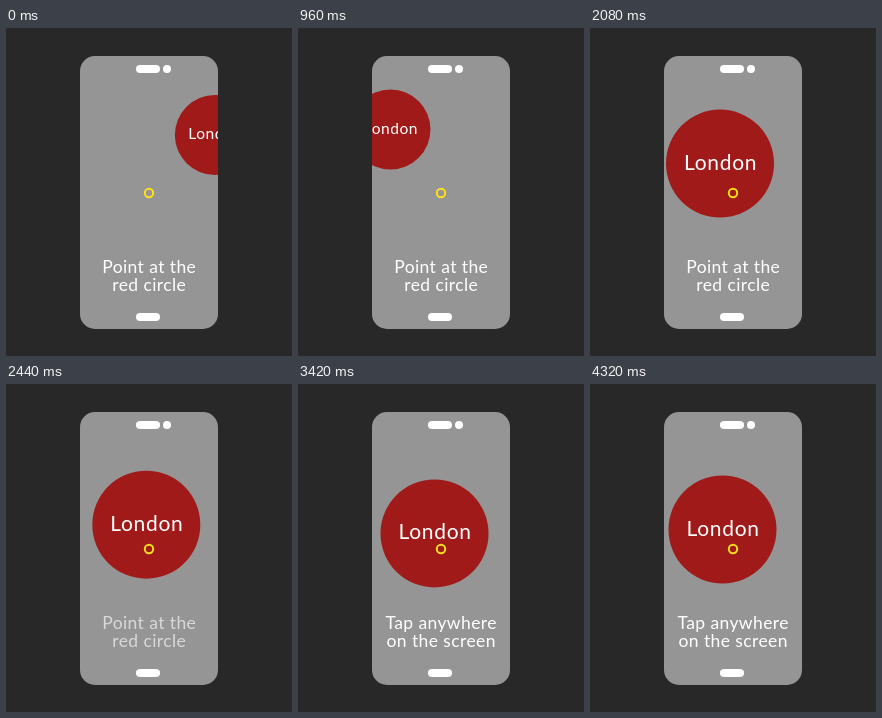
Write an HTML page that moves like this. It is 286 px wide and 328 px high and loops after 4.96 s.

```html
<!DOCTYPE html>
<html lang="en">
<head>
<meta charset="utf-8">
<title>Point and tap</title>
<style>
  html, body { margin: 0; width: 100%; height: 100%; overflow: hidden; background: #282828; }
  svg { display: block; width: 100vw; height: 100vh; }
  text { font-family: Lato, "Open Sans", sans-serif; fill: #fff; text-anchor: middle; }
  .hint { font-size: 17.5px; letter-spacing: .4px; }
  .label { font-size: 21px; letter-spacing: .7px; }
</style>
</head>
<body>
<svg viewBox="0 0 286 328">
  <defs>
    <clipPath id="screen"><rect x="74" y="28" width="138" height="273" rx="15"/></clipPath>
  </defs>
  <rect width="286" height="328" fill="#282828"/>
  <g clip-path="url(#screen)">
    <rect x="74" y="28" width="138" height="273" fill="#959595"/>
    <g id="target">
      <circle r="54" fill="#a01a1a"/>
      <text class="label" x=".6" y="6">London</text>
    </g>
  </g>
  <g fill="#fff">
    <rect x="130" y="37" width="24" height="8" rx="4"/>
    <circle cx="161" cy="41" r="4"/>
    <rect x="130" y="285" width="24" height="8" rx="4"/>
  </g>
  <circle cx="143" cy="165" r="4.2" fill="none" stroke="#ffe01a" stroke-width="2"/>
  <g id="point" class="hint">
    <text x="143.2" y="244.7">Point at the</text>
    <text x="143.2" y="262.7">red circle</text>
  </g>
  <g id="tap" class="hint">
    <text x="143.2" y="244.7">Tap anywhere</text>
    <text x="143.2" y="262.7">on the screen</text>
  </g>
</svg>
<script>
const LOOP = 4960;

// Waypoints of the circle's centre: [ms, x, y]
const path = [
  [0, 209, 107],
  [540, 133.5, 85.3],
  [960, 92.5, 101.5],
  [1080, 91.5, 102.5],
  [1660, 113.5, 123],
  [2080, 130, 135.5],
  [2160, 131.4, 136.5],
  [2640, 144, 142.3],
  [2800, 138, 142],
  [3140, 130.4, 147],
  [3300, 132, 151.3],
  [3420, 136.5, 149.5],
  [3780, 143, 142.5],
  [3940, 145.5, 134.6],
  [4320, 132.5, 145.5]
];

const byId = id => document.getElementById(id);
const target = byId('target'), point = byId('point'), tap = byId('tap');

const ramp = (t, from, to) => {
  const u = Math.min(1, Math.max(0, (t - from) / (to - from)));
  return u * u * (3 - 2 * u);
};

const secant = (i, axis) =>
  (path[i + 1][axis] - path[i][axis]) / (path[i + 1][0] - path[i][0]);

// Monotone tangents: the path rests at each turning point and never overshoots.
function slope(i, axis) {
  if (i === 0) return secant(0, axis);
  if (i === path.length - 1) return 0;
  const a = secant(i - 1, axis), b = secant(i, axis);
  return a * b > 0 ? 2 * a * b / (a + b) : 0;
}

function position(t, axis) {
  const last = path.length - 1;
  if (t >= path[last][0]) return path[last][axis];
  const i = path.findIndex(p => p[0] > t) - 1;
  const span = path[i + 1][0] - path[i][0];
  const u = (t - path[i][0]) / span;
  const from = path[i][axis], to = path[i + 1][axis];
  const blend = u * u * (3 - 2 * u);
  return from + (to - from) * blend
    + span * u * (1 - u) * ((1 - u) * slope(i, axis) - u * slope(i + 1, axis));
}

function render(t) {
  const radius = 40 + 14 * ramp(t, 1680, 1760);
  const x = position(t, 1).toFixed(2), y = position(t, 2).toFixed(2);
  target.setAttribute('transform', `translate(${x} ${y}) scale(${radius / 54})`);
  point.setAttribute('opacity', 1 - ramp(t, 2400, 2500));
  tap.setAttribute('opacity', ramp(t, 2950, 3050));
}

const start = performance.now();
function tick() {
  render((performance.now() - start) % LOOP);
  requestAnimationFrame(tick);
}
render(0);
requestAnimationFrame(tick);
</script>
</body>
</html>
```
